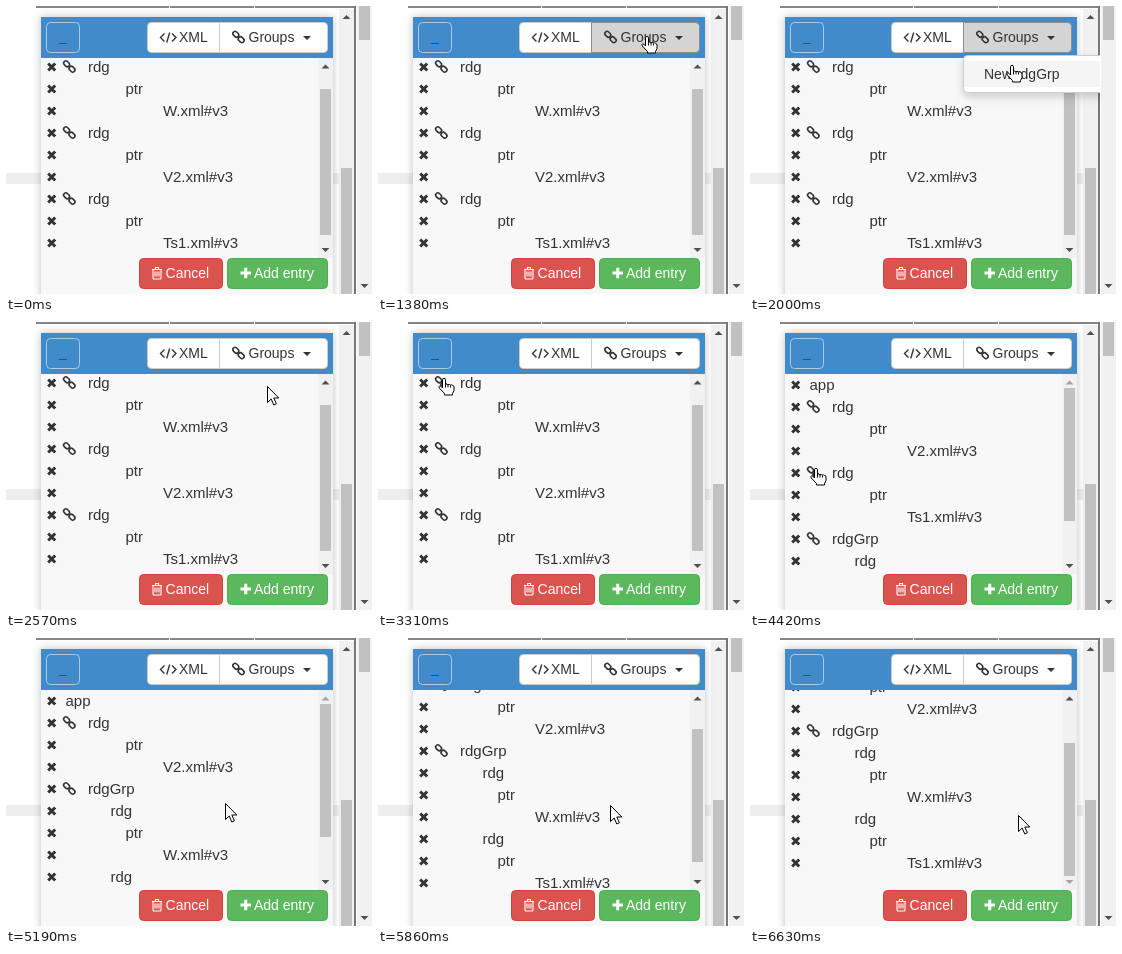
An HTML page that plays this animation: 366 px wide and 288 px high, repeating every 7.75 s.

```html
<!DOCTYPE html>
<html lang="en">
<head>
<meta charset="utf-8">
<title>Entry editor</title>
<style>
  html, body { margin: 0; width: 100%; height: 100%; overflow: hidden; background: #fff; }
  svg { display: block; }
  text { font: 14px "Liberation Sans", Arial, sans-serif; fill: #333; white-space: pre; }
  #list text { font-size: 15px; }
  .light text { fill: #fff; }
  .icon { fill: none; stroke: #333; }
  .light .icon { stroke: #fff; }
  .btn { fill: #fff; stroke: #ccc; }
  .btn.hover { fill: #e6e6e6; stroke: #adadad; }
  .btn.active { fill: #d4d4d4; stroke: #8c8c8c; }
  .track { fill: #f1f1f1; }
  .thumb { fill: #c1c1c1; }
  .arrow { fill: #505050; }
  .arrow.off { fill: #a3a3a3; }
  #panel { filter: drop-shadow(0 0 4px rgba(0, 0, 0, .25)); }
  #menu { filter: drop-shadow(0 4px 4px rgba(0, 0, 0, .17)); }
  .pointer { fill: #fff; stroke: #000; stroke-linejoin: round; }
</style>
</head>
<body>
<svg width="366" height="288" viewBox="0 0 366 288">
  <defs>
    <g id="link" class="icon" stroke-width="1.6">
      <rect x="-3.2" y="-2.2" width="6.4" height="4.4" rx="2.1" transform="translate(-2.7 -2.7) rotate(45)"/>
      <rect x="-3.2" y="-2.2" width="6.4" height="4.4" rx="2.1" transform="translate(2.7 2.7) rotate(45)"/>
    </g>
    <path id="cross" class="icon" stroke-width="3" d="M-3.5-3.5l7 7m0-7l-7 7"/>
    <path id="up" d="M-4 2L0-2 4 2z"/>
    <clipPath id="view"><rect x="35" y="52" width="277" height="200"/></clipPath>
  </defs>

  <!-- page behind the panel -->
  <rect y="167" width="334" height="11" fill="#eee"/>
  <rect x="30" width="320" height="2" fill="#858585"/>
  <path d="M163.5 0v2M248.5 0v2" stroke="#eee"/>
  <rect class="track" x="333" y="3" width="15" height="285"/>
  <rect class="thumb" x="335" y="162" width="11" height="126"/>
  <use href="#up" class="arrow" x="340.5" y="11"/>
  <rect x="348" width="2" height="288" fill="#777"/>

  <g id="panel">
    <rect x="35" y="11" width="292" height="290" fill="#f8f8f8"/>
    <rect x="35" y="11" width="292" height="41" fill="#428bca"/>
  </g>
  <rect x="40.5" y="16.5" width="33" height="30" rx="4" fill="#428bca" stroke="#a9cbe8"/>
  <text x="53" y="36" font-weight="bold" style="font-weight:bold;fill:#222">_</text>
  <path class="btn" d="M213.5 16.5h-68a4 4 0 0 0-4 4v22a4 4 0 0 0 4 4h68z"/>
  <path class="icon" stroke-width="1.4" d="M158.5 27.5l-4 4 4 4m5.2-9l-3 10m5.300-9l4 4-4 4"/>
  <text x="173" y="36">XML</text>
  <path id="groups" class="btn" d="M213.500 16.500h104a4 4 0 0 1 4 4v22a4 4 0 0 1-4 4h-104z"/>
  <use href="#link" x="232.500" y="31"/>
  <text x="242.500" y="36">Groups</text>
  <path d="M297 30h8l-4 4z" fill="#333"/>

  <g clip-path="url(#view)"><g id="list"></g></g>
  <rect class="track" x="312" y="52" width="15" height="200"/>
  <rect id="thumb" class="thumb" x="314" width="11"/>
  <use id="top" href="#up" class="arrow" x="319.500" y="60.500"/>
  <g transform="translate(319.500 244) scale(1 -1)"><use id="end" href="#up" class="arrow"/></g>

  <g class="light">
    <rect x="133.500" y="252.500" width="83" height="30" rx="4" fill="#d9534f" stroke="#d43f3a"/>
    <path class="icon" stroke-width="1.100" d="M146 263.500h10m-6.500 0v-2h3v2m-5.500 0v8.500q0 1 1 1h6q1 0 1-1v-8.500m-6 2v5m2-5v5m2-5v5"/>
    <text x="159.600" y="272">Cancel</text>
    <rect x="221.500" y="252.500" width="100" height="30" rx="4" fill="#5cb85c" stroke="#4cae4c"/>
    <path class="icon" stroke-width="3" d="M234.500 267h10.500m-5.250-5.250v10.500"/>
    <text x="248" y="272">Add entry</text>
  </g>

  <g id="menu">
    <rect x="213.500" y="49.500" width="159" height="37" rx="4" fill="#fff" stroke="#ccc"/>
    <rect id="item" x="214" y="55" width="158" height="26" fill="#f5f5f5"/>
    <text x="234" y="73">New rdgGrp</text>
  </g>

  <rect x="350" width="1" height="288" fill="#fff"/>
  <rect class="track" x="351" width="15" height="288"/>
  <rect class="thumb" x="353" width="11" height="34"/>
  <path class="arrow" d="M354.500 278h8l-4 4z"/>

  <g id="cursor" class="pointer">
    <path id="arrow" d="M.5.5v16l3.700-3.500 2.600 6 2.600-1.200-2.600-5.800h5z"/>
    <g id="hand">
      <path d="M-1.500 9V.8q0-1.500 1.500-1.500t1.500 1.500v4.700q1.200-1 2.400.2 1.300-.8 2.400.4 1.400-.7 2.500.4 1.200 0 1.200 1.500v3.500l-1.500 3v1.500h-8v-1.500L-4.700 9q-.8-1.600.4-2.200 1-.4 2.800 2.200z"/>
      <path d="M1.500 5.500v3m2.500-2.500v2.500m2.500-2v2" fill="none"/>
    </g>
  </g>
</svg>
<script>
const LOOP = 7750, VIEW = 200, ROW = 22, TRACK = 172;
const $ = id => document.getElementById(id);

// Row: label, text x, has a link icon
const app = ['app', 59.5];
const rdg = file => [['rdg', 82, true], ['ptr', 119.5], [file, 157]];
const member = file => [['rdg', 104.5], ['ptr', 119.5], [file, 157]];
const group = ['rdgGrp', 82, true];
const W = 'W.xml#v3', V2 = 'V2.xml#v3', TS = 'Ts1.xml#v3';
const lists = [
  [app, ...rdg(W), ...rdg(V2), ...rdg(TS)],
  [app, ...rdg(V2), ...rdg(TS), group, ...member(W)],
  [app, ...rdg(V2), group, ...member(W), ...member(TS)]
];

// Held values: [start time, value]
const listAt = [[0, 0], [3630, 1], [4760, 2]];
const scrollAt = [[0, 24], [3630, 0], [5760, 6], [5810, 21], [5860, 38], [5910, 48], [5960, 55], [6010, 58]];
const buttonAt = [[0, ''], [1050, 'hover'], [1380, 'active'], [2400, '']];
const pointerAt = [[0, 'none'], [1050, 'hand'], [2570, 'arrow'], [3180, 'hand'], [3860, 'arrow'],
  [4020, 'hand'], [4110, 'arrow'], [4380, 'hand'], [4890, 'arrow']];

// Cursor tip: [time, x, y], linear in between
const path = [
  [1050, 270, 43], [1210, 269, 31], [1790, 269, 31], [2000, 262, 60], [2159, 262, 60], [2160, 262, 64],
  [2590, 261, 64], [2750, 218, 80], [2870, 160, 86], [3000, 104, 76], [3140, 69, 57],
  [3309, 69, 57], [3310, 66, 57], [3860, 66, 57], [3920, 66, 54], [4060, 67, 85], [4240, 67, 122],
  [4420, 66, 147], [4850, 66, 147], [5000, 122, 151], [5120, 196, 162], [5230, 232, 167],
  [6350, 232, 167], [6490, 253, 172], [6630, 268, 177]
];

const held = (steps, t) => steps.filter(s => s[0] <= t).pop()[1];

function tip(t) {
  const i = path.findIndex(p => p[0] > t);
  if (i < 1) return (i ? path[path.length - 1] : path[0]).slice(1);
  const [t0, x0, y0] = path[i - 1], [t1, x1, y1] = path[i];
  const k = (t - t0) / (t1 - t0);
  return [Math.round(x0 + (x1 - x0) * k), Math.round(y0 + (y1 - y0) * k)];
}

const markup = rows => rows.map(([label, x, link], i) => {
  const y = 63 + i * ROW;
  return `<use href="#cross" x="45.7" y="${y}"/>` +
    (link ? `<use href="#link" x="63.3" y="${y - 0.5}"/>` : '') +
    `<text x="${x}" y="${y + 5}">${label}</text>`;
}).join('');

const show = (id, on) => $(id).setAttribute('visibility', on ? 'visible' : 'hidden');
let shown = -1;

function draw(t) {
  const index = held(listAt, t), scroll = held(scrollAt, t);
  if (index !== shown) $('list').innerHTML = markup(lists[shown = index]);
  $('list').setAttribute('transform', `translate(0 ${-scroll})`);

  const height = lists[index].length * ROW + 16;
  $('thumb').setAttribute('y', Math.round(66 + scroll * TRACK / height));
  $('thumb').setAttribute('height', Math.round(VIEW * TRACK / height));
  $('top').classList.toggle('off', scroll === 0);
  $('end').classList.toggle('off', scroll === height - VIEW);

  $('groups').setAttribute('class', 'btn ' + held(buttonAt, t));
  const open = t >= 1510 && t < 2400;
  show('menu', open);
  show('item', open && t >= 1960);

  const pointer = held(pointerAt, t);
  show('arrow', pointer === 'arrow');
  show('hand', pointer === 'hand');
  $('cursor').setAttribute('transform', `translate(${tip(t)})`);
}

const start = performance.now();
function tick() {
  draw((performance.now() - start) % LOOP);
  requestAnimationFrame(tick);
}
tick();
</script>
</body>
</html>
```
